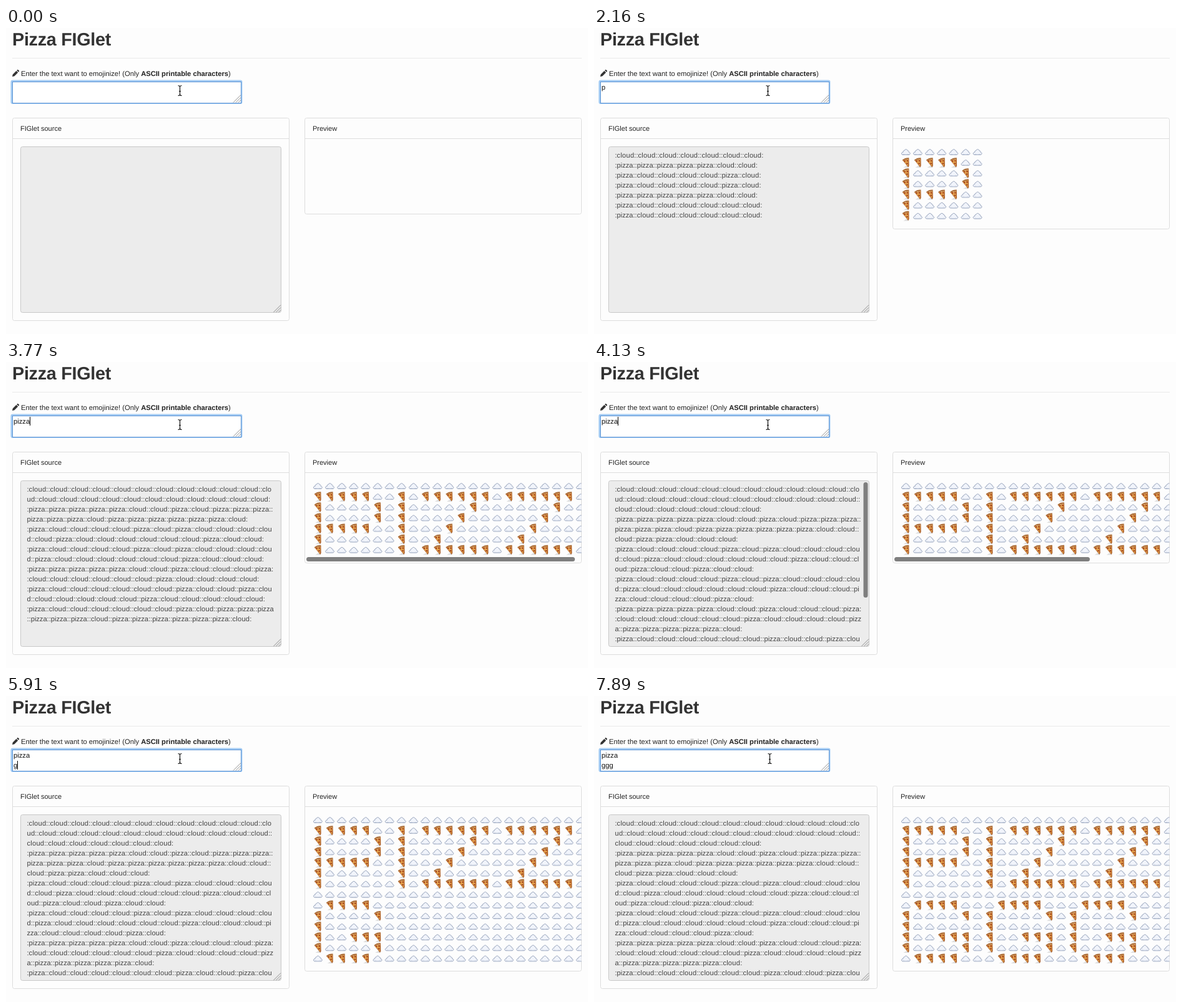
An HTML page that plays this animation: 932 px wide and 491 px high, repeating every 8 s.

```html
<!DOCTYPE html>
<html lang="en">
<head>
<meta charset="utf-8">
<title>Pizza FIGlet</title>
<style>
  html, body { margin: 0; width: 100%; height: 100%; overflow: hidden; background: #fdfdfd; }
  svg { display: block; }
  text { font: 11.2px "Liberation Sans", Arial, sans-serif; fill: #222; white-space: pre; text-rendering: geometricPrecision; }
  .title { font-size: 28.8px; font-weight: 700; letter-spacing: -.3px; fill: #333; }
  .bold { font-weight: 700; }
  .head { font-size: 11px; }
  .panel { fill: none; stroke: #ddd; }
  .grip { fill: none; stroke: #8d8d8d; }
  #typed text { fill: #111; }
  #source text { fill: #444; }
  .cloud { letter-spacing: .2px; }
  .pizza { letter-spacing: -.05px; }
  .thumb { fill: #7f7f7f; }
</style>
</head>
<body>
<svg width="932" height="491" viewBox="0 0 932 491">
  <defs>
    <clipPath id="sourceClip"><rect x="24" y="191" width="416" height="262"/></clipPath>
    <clipPath id="previewClip"><rect x="479" y="178" width="442.5" height="270"/></clipPath>
    <g id="cloud">
      <path d="M-4.500 4.500C-7.800 4.500-7.800 .2-4.400 .4C-4.800-1.800-3.200-2.400-2.500-2C-2-5 2.600-5 3-1.800C4.600-2.200 5.200-.6 4.800 .5C7.600 .4 7.600 4.500 4.500 4.500Z" fill="#f1f4fb" stroke="#8f9cb6" stroke-width=".9"/>
      <path d="M-5 3.500Q0 4.600 5 3.500" fill="none" stroke="#c3ccdd"/>
    </g>
    <g id="pizza">
      <path d="M-4 7.800L4.500 7.800L4.500 5L1 5Z" fill="#dcdcdc"/>
      <path d="M-5-3.500L5-6L5.200 5L3.800 7.500Z" fill="#a85a25"/>
      <path d="M-4.600-3.600L4.200-5.500L3.600 6Z" fill="#e2a04a"/>
      <path d="M-5.600-4.500Q-1-8.300 5-7.800L5-5.600Q-1-6-4.800-2.800Z" fill="#ad6f3a"/>
      <g fill="#9c3a1e"><circle cx="-1.800" cy="-2.600" r="1.200"/><circle cx="2.400" cy="-3" r="1.200"/><circle cx="2" cy="1.300" r="1.200"/></g>
    </g>
    <path id="beam" d="M-3-7.500Q0-7.500 0-5.500Q0-7.500 3-7.500M0-6V7M-3 8.500Q0 8.500 0 6.500Q0 8.500 3 8.500M-1.500 1.500H1.500"/>
  </defs>

  <rect width="932" height="491" fill="#fdfdfd"/>
  <text class="title" x="10" y="28">Pizza FIGlet</text>
  <path d="M10 48.500H922" stroke="#eaeaea"/>
  <path d="M10 78L10.800 74.500L16.500 68.800L19.200 71.500L13.500 77.200ZM17.200 68L18.300 67Q19 66.500 19.700 67.200L20.900 68.400Q21.400 69 20.800 69.700L19.900 70.700Z" fill="#333"/>
  <text x="24" y="77">Enter the text want to emojinize! (Only <tspan class="bold">ASCII printable characters</tspan>)</text>

  <rect x="8.750" y="84.750" width="368.500" height="36" rx="2" fill="#fff" stroke="#a3cbf4" stroke-width="2.500"/>
  <rect x="10.500" y="86.500" width="366" height="34" fill="#fff" stroke="#5b93d3"/>
  <path class="grip" d="M364 119.500L376 107.500M368 119.500L376 111.500M372 119.500L376 115.500"/>
  <g id="typed"><text x="12" y="99"></text><text x="12" y="115"></text></g>
  <rect id="caret" width="1" height="14" fill="#000"/>

  <rect class="panel" x="10.500" y="144.500" width="443" height="325" rx="3"/>
  <path class="panel" d="M10.500 177.500H453.500"/>
  <text class="head" x="23" y="165">FIGlet source</text>
  <rect x="23.500" y="190.500" width="417" height="266" rx="3" fill="#ececec" stroke="#c8c8c8"/>
  <g id="source" clip-path="url(#sourceClip)"></g>
  <path class="grip" d="M428.500 456L440 444.500M432.500 456L440 448.500M436.500 456L440 452.500"/>
  <rect id="sourceThumb" class="thumb" x="431.500" y="193" width="7" rx="3.500"/>

  <rect id="previewPanel" class="panel" x="478.500" y="144.500" width="443" rx="3"/>
  <path class="panel" d="M478.500 177.500H921.500"/>
  <text class="head" x="491" y="165">Preview</text>
  <g id="preview" clip-path="url(#previewClip)"></g>
  <rect id="previewThumb" class="thumb" x="481" y="313" height="7" rx="3.500"/>

  <g id="mouse" fill="none">
    <use href="#beam" stroke="#fff" stroke-width="2.600"/>
    <use href="#beam" stroke="#111" stroke-width="1.200"/>
  </g>
</svg>
<script>
const LOOP = 8000;

// Banner letters, rows two to seven; the first row is always empty.
const GLYPHS = {
  p: ['#####  ', '#    # ', '#    # ', '#####  ', '#      ', '#      '],
  i: Array(6).fill('# '),
  z: ['###### ', '    #  ', '   #   ', '  #    ', ' #     ', '###### '],
  a: ['  ##   ', ' #  #  ', '#    # ', '###### ', '#    # ', '#    # '],
  g: [' ####  ', '#    # ', '#      ', '#  ### ', '#    # ', ' ####  ']
};

// Each step keeps the values it does not change.
// across and down are the lengths of the scroll thumbs, fade their opacity.
const steps = [
  { at: 0, text: '', caret: 0, output: '', across: 0, down: 0, fade: 1, mouse: 278.5 },
  { at: 540, caret: 1 },
  { at: 1260, caret: 0 },
  { at: 1620, text: 'p', caret: 1 },
  { at: 1980, output: 'p' },
  { at: 2160, caret: 0 },
  { at: 2520, text: 'pi', caret: 1 },
  { at: 2880, output: 'pi' },
  { at: 3060, caret: 0 },
  { at: 3230, text: 'piz', caret: 1 },
  { at: 3410, text: 'pizz' },
  { at: 3590, output: 'piz' },
  { at: 3770, text: 'pizza', output: 'pizz', across: 430 },
  { at: 4130, output: 'pizza', across: 313, down: 185 },
  { at: 4310, caret: 0 },
  { at: 4660, fade: .5 },
  { at: 4840, text: 'pizza\n', caret: 1, across: 0, down: 0 },
  { at: 5380, caret: 0, output: 'pizza\n', down: 100, fade: 1 },
  { at: 5550, text: 'pizza\ng', caret: 1 },
  { at: 5730, fade: .5 },
  { at: 5910, output: 'pizza\ng', down: 0 },
  { at: 6090, caret: 0 },
  { at: 6630, caret: 1 },
  { at: 6990, text: 'pizza\ngg' },
  { at: 7170, text: 'pizza\nggg', output: 'pizza\ngg' },
  { at: 7710, caret: 0 },
  { at: 7890, output: 'pizza\nggg', mouse: 281.5 }
];
const states = [];
for (const step of steps) states.push({ ...states[states.length - 1], ...step });

const $ = id => document.getElementById(id);
const set = (node, attrs) => {
  for (const key in attrs) node.setAttribute(key, attrs[key]);
  return node;
};
const add = (parent, tag, attrs) =>
  parent.appendChild(set(document.createElementNS('http://www.w3.org/2000/svg', tag), attrs));

function banner(output) {
  if (!output) return [];
  const rows = output.split('\n').flatMap(word => {
    const body = GLYPHS.p.map((_, r) => [...word].map(c => GLYPHS[c][r]).join(''));
    return ['', ...body];
  });
  const width = Math.max(...rows.map(r => r.length));
  return rows.map(r => r.padEnd(width));
}

// Approximate advances in em, used to break the long lines.
const ADVANCE = { ':': .278, c: .537, l: .222, o: .574, u: .556, d: .593, p: .593, i: .222, z: .48, a: .537 };

function wrap(row) {
  const lines = [''];
  let width = 0;
  for (const c of [...row].map(cell => cell === '#' ? ':pizza:' : ':cloud:').join('')) {
    const w = ADVANCE[c] * 11.19;
    if (width + w > 396) {
      lines.push('');
      width = 0;
    }
    lines[lines.length - 1] += c;
    width += w;
  }
  return lines;
}

function drawSource(rows) {
  $('source').replaceChildren();
  rows.flatMap(wrap).slice(0, 16).forEach((line, n) => {
    const text = add($('source'), 'text', { x: 33.5, y: 208 + 16 * n });
    for (const run of line.match(/:+|[^:]+/g)) {
      const kind = run[0] === ':' ? '' : /[piza]/.test(run) ? 'pizza' : 'cloud';
      add(text, 'tspan', { class: kind }).textContent = run;
    }
  });
}

function drawPreview(rows) {
  $('preview').replaceChildren();
  rows.forEach((row, r) => [...row.slice(0, 23)].forEach((cell, c) =>
    add($('preview'), 'use', {
      href: cell === '#' ? '#pizza' : '#cloud',
      x: 499.4 + 19.13 * c,
      y: 199 + 17.1 * r
    })));
  set($('previewPanel'), { height: rows.length > 7 ? 297 : rows.length ? 178 : 154 });
}

let shownOutput = null;

function draw(s) {
  const lines = s.text.split('\n');
  const fields = [...$('typed').children];
  fields.forEach((field, n) => field.textContent = lines[n] || '');
  const last = lines.length - 1;
  const advance = lines[last] ? fields[last].getComputedTextLength() : 0;
  set($('caret'), { x: Math.round(12 + advance), y: 88 + 16 * last, opacity: s.caret });
  set($('previewThumb'), { width: s.across, opacity: s.fade });
  set($('sourceThumb'), { height: s.down, opacity: s.fade });
  set($('mouse'), { transform: `translate(${s.mouse} 100)` });
  if (s.output !== shownOutput) {
    shownOutput = s.output;
    const rows = banner(s.output);
    drawSource(rows);
    drawPreview(rows);
  }
}

let shown = null;
const start = performance.now();

function tick() {
  const t = (performance.now() - start) % LOOP;
  const state = states.filter(s => s.at <= t).pop();
  if (state !== shown) draw(shown = state);
  requestAnimationFrame(tick);
}
tick();
</script>
</body>
</html>
```
